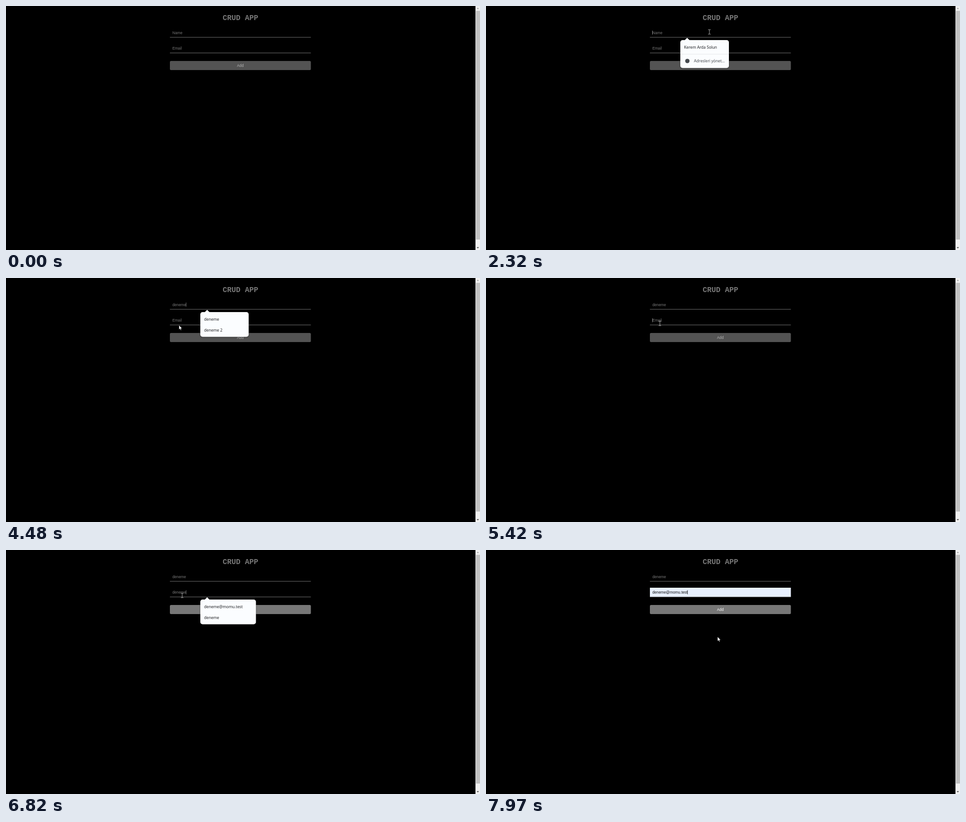
An HTML page that plays this animation: 1044 by 537 pixels, repeating every 8 s.

```html
<!DOCTYPE html>
<html lang="en">
<head>
<meta charset="utf-8">
<title>CRUD APP</title>
<style>
  html, body { margin: 0; width: 100%; height: 100%; overflow: hidden; background: #000; }
  svg { display: block; width: 100vw; height: 100vh; }
  .form { font: 8.3px "Liberation Sans", Arial, sans-serif; fill: #777; }
  .title { font: bold 16.3px "Liberation Mono", "Courier New", monospace; fill: #777; }
  .menu { font: 500 8.6px "Noto Sans", "Open Sans", sans-serif; fill: #202124; }
  .menu .link { font-weight: 400; fill: #45494e; }
  #popup { filter: drop-shadow(0 1px 1.5px rgba(0, 0, 0, .4)); }
</style>
</head>
<body>
<svg viewBox="0 0 1044 537" preserveAspectRatio="none">
  <rect width="1044" height="537"/>
  <text class="title" x="516.4" y="31" text-anchor="middle">CRUD APP</text>

  <g class="form">
    <rect id="filled" x="361" y="83" width="310.5" height="20" fill="#e8f0fe"/>
    <rect x="361" y="68.4" width="310.5" height="1"/>
    <rect x="361" y="102.8" width="310.5" height="1"/>
    <text id="name" x="366.4" y="61.8"/>
    <text id="email" x="366.4" y="96.2"/>
    <rect id="caret" width=".8" height="9"/>
    <g id="button">
      <rect x="361" y="121" width="310.5" height="20" rx="2.5"/>
      <text x="516.2" y="134.3" text-anchor="middle" fill="#fff">Add</text>
    </g>
  </g>

  <clipPath id="reveal"><rect id="limit" x="420" width="170"/></clipPath>
  <g clip-path="url(#reveal)"><g id="popup" class="menu"></g></g>

  <path id="arrow" fill="#fff" stroke="#000" stroke-width=".5"
    d="M0 0V9.6L2.2 7.6L3.8 11L5.3 10.3L3.8 7.1H6.8Z"/>
  <path id="beam" fill="none" stroke="#ccc" stroke-width=".9"
    d="M-2.8 -5H-.8L0 -4.4L.8 -5H2.8M0 -4.4V4.4M-2.8 5H-.8L0 4.4L.8 5H2.8"/>

  <rect x="1034" width="10" height="537" fill="#f1f1f1"/>
  <rect x="1035" y="10.5" width="9" height="503.5" fill="#c1c1c1"/>
  <path d="M1036.5 6.5L1039.2 3.7L1042 6.5Z" fill="#a3a3a3"/>
  <path d="M1036.5 530.7L1039.2 533.5L1042 530.7Z" fill="#505050"/>
</svg>
<script>
const LOOP = 8000;
const MAIL = 'deneme@momu.test';
const $ = id => document.getElementById(id);
const set = (el, attrs) => { for (const k in attrs) el.setAttribute(k, attrs[k]); };
const show = (el, on) => set(el, { visibility: on ? 'visible' : 'hidden' });
const clamp = v => Math.max(0, Math.min(1, v));

// Pointer path: time, x, y
const path = [
  [370, 545, 142], [560, 490, 92], [740, 440, 18], [920, 382, 62], [1130, 420, 112],
  [1200, 432, 122], [1400, 470, 129], [1680, 484, 80], [1960, 490, 53], [2180, 492, 57],
  [2510, 492, 57], [2780, 424, 60], [3000, 393, 90], [3200, 381, 104],
  [5210, 381, 104], [5400, 383, 100], [6740, 383, 100], [6820, 388, 100],
  [6890, 391, 100], [7180, 450, 118], [7420, 484, 126], [7600, 490, 127],
  [7780, 505, 209], [7970, 510, 191]
];

// Times of the keystrokes that spell "deneme" in each field
const nameKeys = [3800, 4070, 4200, 4270, 4340, 4480];
const mailKeys = [5690, 5830, 5970, 6110, 6230, 6360];

// Suggestion lists: start, end, top, right edge, entries
const popups = [
  { from: 2250, to: 3800, top: 75, right: 535, items: ['Kerem Arda Solun'], manage: true },
  { from: 3800, to: 4070, top: 75, right: 535, items: ['dsfaa', 'deneme', 'dsf', 'deneme 2', 'dsfa'], grow: true },
  { from: 4070, to: 5400, top: 75, right: 534.5, items: ['deneme', 'deneme 2'] },
  { from: 5480, to: 5690, top: 109, right: 576.5, items: [MAIL, 'deneme', 'dsf', 'asd', 'sdfsdf', 'asdasdasdasdasdasd'] },
  { from: 5690, to: 5830, top: 109, right: 551.5, items: [MAIL, 'deneme', 'dsf'] },
  { from: 5830, to: 7640, top: 109, right: 550.5, items: [MAIL, 'deneme'] }
];

// Intervals with a visible caret
const caretOn = [[2250, 2800], [3330, 5010], [5400, 6890], [7560, LOOP]];

const typed = (keys, t) => 'deneme'.slice(0, keys.filter(k => t >= k).length);

function pointerAt(t) {
  const i = path.findIndex(p => p[0] > t);
  if (i === 0) return null;
  if (i < 0) return path[path.length - 1].slice(1);
  const [a, b] = [path[i - 1], path[i]];
  const k = (t - a[0]) / (b[0] - a[0]);
  return [a[1] + (b[1] - a[1]) * k, a[2] + (b[2] - a[2]) * k];
}

const heightOf = p => p.manage ? 61.5 : 5.5 + 24.5 * p.items.length;

function popupMarkup(p, hover) {
  const { top, right } = p;
  const w = right - 428;
  let out = `<path fill="#fbfdff" d="M437.5 ${top + .5}L443 ${top - 5}L448.5 ${top + .5}Z"/>
    <rect x="428" y="${top}" width="${w}" height="${heightOf(p)}" rx="5" fill="#fbfdff"/>`;
  if (hover) out += `<rect x="428" y="${top + 4}" width="${w}" height="24.5" fill="#e8eaed"/>`;
  p.items.forEach((s, i) => out += `<text x="436.3" y="${top + 18.7 + 24.5 * i}">${s}</text>`);
  if (p.manage) out += `<rect x="428" y="${top + 30.5}" width="${w}" height="1" fill="#e3e5ea"/>
    <circle cx="443.5" cy="${top + 46}" r="4.8" fill="#45494e"/>
    <text class="link" x="458" y="${top + 49.2}">Adresleri yönet...</text>`;
  return out;
}

let lastMarkup = '';

function draw(t) {
  const pos = pointerAt(t);
  const popup = popups.find(p => t >= p.from && t < p.to);
  const overPopup = pos && popup && pos[0] > 428 && pos[0] < popup.right &&
    pos[1] > popup.top && pos[1] < popup.top + heightOf(popup);
  const hover = t > 6890 && overPopup;
  const filled = hover || t >= 7560;

  const name = typed(nameKeys, t), email = filled ? MAIL : typed(mailKeys, t);
  $('name').textContent = name || 'Name';
  $('email').textContent = email || 'Email';
  set($('email'), { fill: filled ? '#111' : '#777' });
  show($('filled'), filled);
  set($('button'), { opacity: .7 + .3 * clamp((t - 5720) / 300) });

  const inMail = t >= 5400;
  const field = $(inMail ? 'email' : 'name');
  const width = (inMail ? email : name) ? field.getComputedTextLength() : 0;
  set($('caret'), { x: 366.3 + width, y: inMail ? 88.5 : 54, fill: filled ? '#000' : '#999' });
  show($('caret'), caretOn.some(([a, b]) => t >= a && t < b));

  const markup = popup ? popupMarkup(popup, hover) : '';
  if (markup !== lastMarkup) $('popup').innerHTML = lastMarkup = markup;
  set($('popup'), { opacity: popup && popup.manage ? clamp((t - 2200) / 110) : 1 });
  set($('limit'), { height: popup && popup.grow && t < popup.from + 70 ? 140 : 537 });

  const inField = pos && pos[0] > 361 && pos[0] < 671 && !overPopup &&
    ((pos[1] > 48 && pos[1] < 69) || (pos[1] > 83 && pos[1] < 103));
  show($('beam'), inField);
  show($('arrow'), pos && !inField);
  if (pos) set($(inField ? 'beam' : 'arrow'), { transform: `translate(${pos})` });
}

const start = performance.now();
function tick() {
  draw((performance.now() - start) % LOOP);
  requestAnimationFrame(tick);
}
tick();
</script>
</body>
</html>
```
